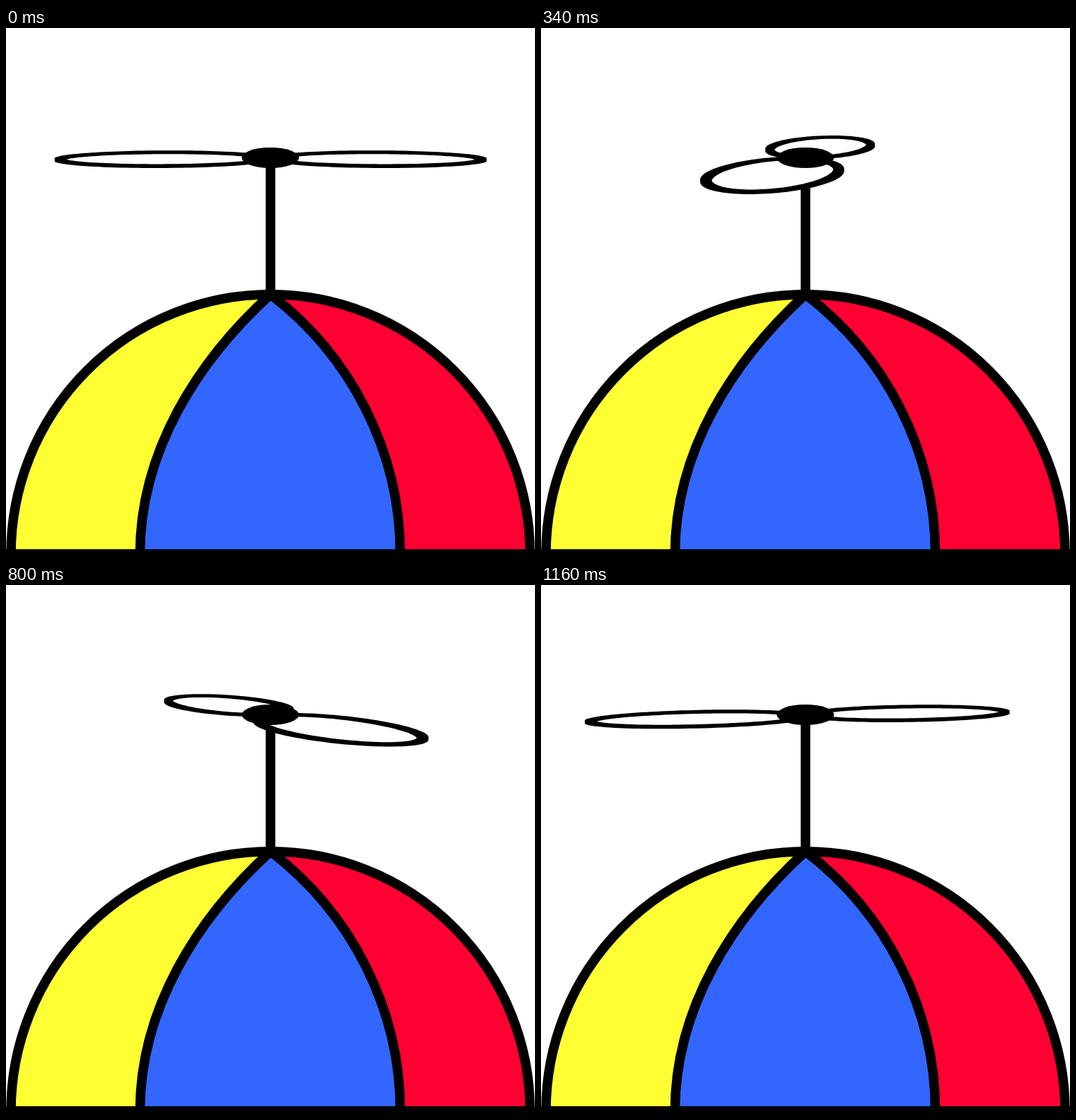
Animation, 748 px wide and 748 px high, one loop 1180 ms. Source, as an HTML page with a canvas:

```html
<!DOCTYPE html>
<html lang="en">
<head>
<meta charset="utf-8">
<title>Propeller cap</title>
<style>
  html, body { margin: 0; height: 100%; overflow: hidden; background: #fff; }
  canvas { display: block; width: 748px; height: 748px; }
</style>
</head>
<body>
<canvas id="stage" width="748" height="748"></canvas>
<script>
const ctx = document.getElementById('stage').getContext('2d');

const STEP_MS = 20, STEPS = 59, STEP_ANGLE = Math.PI / 30;
const PIVOT = { x: 374.2, y: 184 };
const TILT = 0.126, PERSPECTIVE = 0.00082;
const BLADE = { length: 151.3, width: 83, offset: 6.5, rim: 13.5, thickness: 3.6 };

const leftSeam = 'C189.5 599 270.5 471 374 376.7';
const rightSeam = 'C488 464 557.5 599 557.5 743.7';
const cap = {
  dome: new Path2D('M7 743.7A367 367 0 0 1 741 743.7Z'),
  blue: new Path2D(`M189.5 743.7${leftSeam}${rightSeam}Z`),
  red: new Path2D(`M374 376.7${rightSeam}H741A367 367 0 0 0 374 376.7Z`),
  base: new Path2D('M0 743.7H748'),
  rod: new Path2D('M374 183V376')
};

function fill(path, color) {
  ctx.fillStyle = color;
  ctx.fill(path);
}

// Outline of one blade, seen in perspective; side is 1 or -1.
function bladePath(angle, side, inset, lift) {
  const path = new Path2D();
  const cos = Math.cos(angle), sin = Math.sin(angle);
  for (let i = 0; i < 120; i++) {
    const a = i * Math.PI / 60;
    const u = side * BLADE.length + (BLADE.length - inset) * Math.cos(a);
    const v = BLADE.offset + (BLADE.width - inset) * Math.sin(a);
    const depth = u * sin + v * cos;
    const scale = 1 / (1 - PERSPECTIVE * depth);
    path.lineTo(PIVOT.x + (u * cos - v * sin) * scale,
                PIVOT.y + TILT * depth * scale + lift);
  }
  path.closePath();
  return path;
}

function drawBlade(angle, side) {
  const half = BLADE.thickness / 2;
  for (const lift of [-half, 0, half]) fill(bladePath(angle, side, 0, lift), '#000');
  ctx.save();
  ctx.clip(bladePath(angle, side, BLADE.rim, -half));
  fill(bladePath(angle, side, BLADE.rim, half), '#fff');
  ctx.restore();
}

function drawCap() {
  fill(cap.dome, '#ffff33');
  fill(cap.red, '#ff0033');
  fill(cap.blue, '#3366ff');
  ctx.lineWidth = 13.5;
  for (const part of [cap.dome, cap.blue, cap.base, cap.rod]) ctx.stroke(part);
}

function draw(time) {
  const angle = Math.floor(time / STEP_MS) % STEPS * STEP_ANGLE;
  const front = Math.sin(angle) >= 0 ? 1 : -1;
  ctx.fillStyle = '#fff';
  ctx.fillRect(0, 0, 748, 748);
  ctx.lineJoin = 'round';
  drawCap();
  drawBlade(angle, -front);
  drawBlade(angle, front);
  const hub = new Path2D();
  hub.ellipse(373.8, 183.5, 40.5, 14.5, 0, 0, 2 * Math.PI);
  fill(hub, '#000');
}

const start = performance.now();
function tick() {
  draw(performance.now() - start);
  requestAnimationFrame(tick);
}
tick();
</script>
</body>
</html>
```
